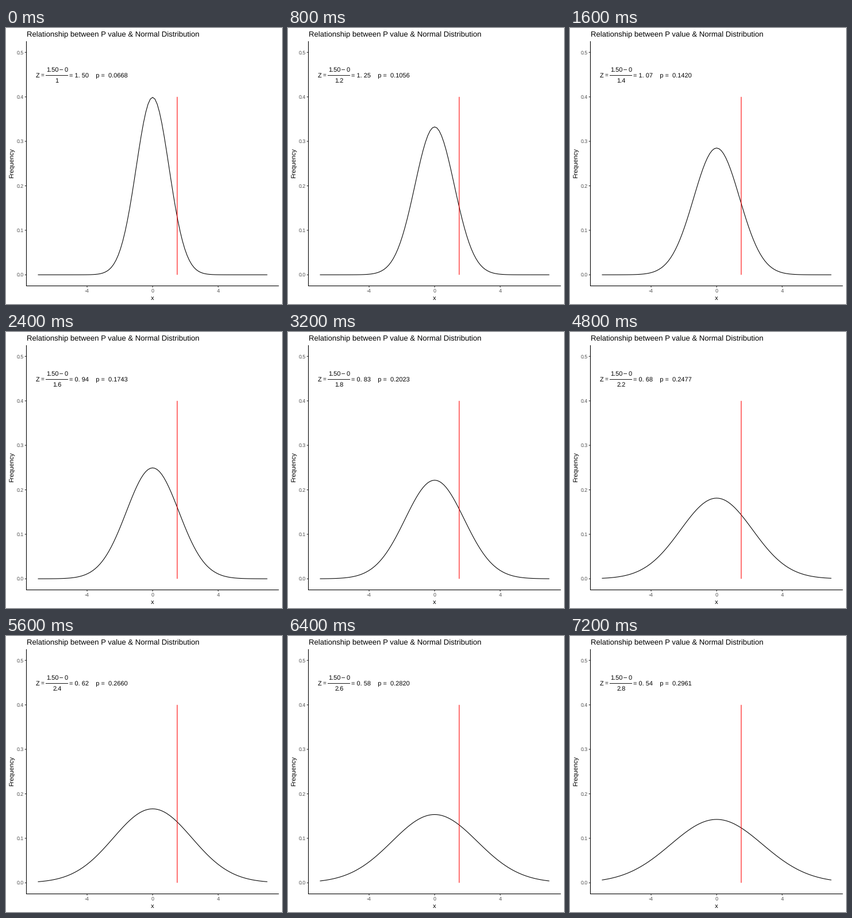
Animation, 480 px wide and 480 px high, one loop 8 s. Source, as a matplotlib script:

```python
import math

import numpy as np
import matplotlib.pyplot as plt
from matplotlib.animation import FuncAnimation

plt.rcParams.update({
    "font.family": "Liberation Sans",
    "text.hinting": "none",
    "lines.solid_capstyle": "butt",
})

SIZE, DPI = 480, 72
STEPS, INTERVAL = 10, 800
CUTOFF = 1.5
LINE = 1.07
GREY, TICK = "#4d4d4d", "#333333"

# One axes unit is one pixel, with y pointing down.
fig = plt.figure(figsize=(SIZE / DPI, SIZE / DPI), dpi=DPI, facecolor="white")
ax = fig.add_axes([0, 0, 1, 1])
ax.set_xlim(0, SIZE)
ax.set_ylim(SIZE, 0)
ax.axis("off")


def px(x):
    return 255 + 28.5 * x


def py(y):
    return 429.2 - 773.6 * y


def line(xs, ys, color="black", width=LINE):
    # Snapping would push half-pixel positions to the next pixel.
    return ax.plot(xs, ys, color=color, lw=width, snap=False)[0]


def label(x, y, s, size=11, color="black", ha="left", **kw):
    return ax.text(x, y, s, fontsize=size, color=color, ha=ha,
                   va="baseline", **kw)


def density(x, sd):
    return np.exp(-0.5 * (x / sd) ** 2) / (sd * math.sqrt(2 * math.pi))


# Axes and titles
for value in np.arange(6) / 10:
    y = py(value)
    line([32.7, 35.5], [y, y], TICK)
    label(30.7, y + 3.1, f"{value:.1f}", 8.8, GREY, "right")
for value in (-4, 0, 4):
    x = px(value)
    line([x, x], [448.5, 451.3], TICK)
    label(x, 460, str(value), 8.8, GREY, "center")
line([35.5, 35.5], [23, 449])
line([35, 474.5], [448.5, 448.5])
label(35.5, 15, "Relationship between P value & Normal Distribution", 13.15)
label(255, 473, "x", ha="center")
label(13, 235, "Frequency", ha="center", rotation=90, rotation_mode="anchor")

# Fixed parts of the formula
label(52, 86, "Z")
label(61, 86, "=", 10)
label(70, 76, "1.50")
line([93.2, 99], [72.5, 72.5], width=0.8)
label(102, 76, "0")
line([69, 108], [82.5, 82.5], width=0.9)

# Moving parts
grid = np.linspace(-7, 7, 101)
curve = line(px(grid), py(density(grid, 1)))
line([px(CUTOFF)] * 2, [py(0), py(0.4)], "red")
divisor = label(88.7, 95, "", ha="center")
result = label(110, 86, "")


def update(step):
    sd = 1 + step / 5
    z = CUTOFF / sd
    p = 0.5 * math.erfc(z / math.sqrt(2))
    whole, decimals = f"{z:.2f}".split(".")
    curve.set_ydata(py(density(grid, sd)))
    divisor.set_text(f"{sd:g}")
    result.set_text(f"= {whole}. {decimals}    p =  {p:.4f}")
    return curve, divisor, result


anim = FuncAnimation(fig, update, frames=STEPS, interval=INTERVAL,
                     repeat=True, repeat_delay=0)
plt.show()
```
